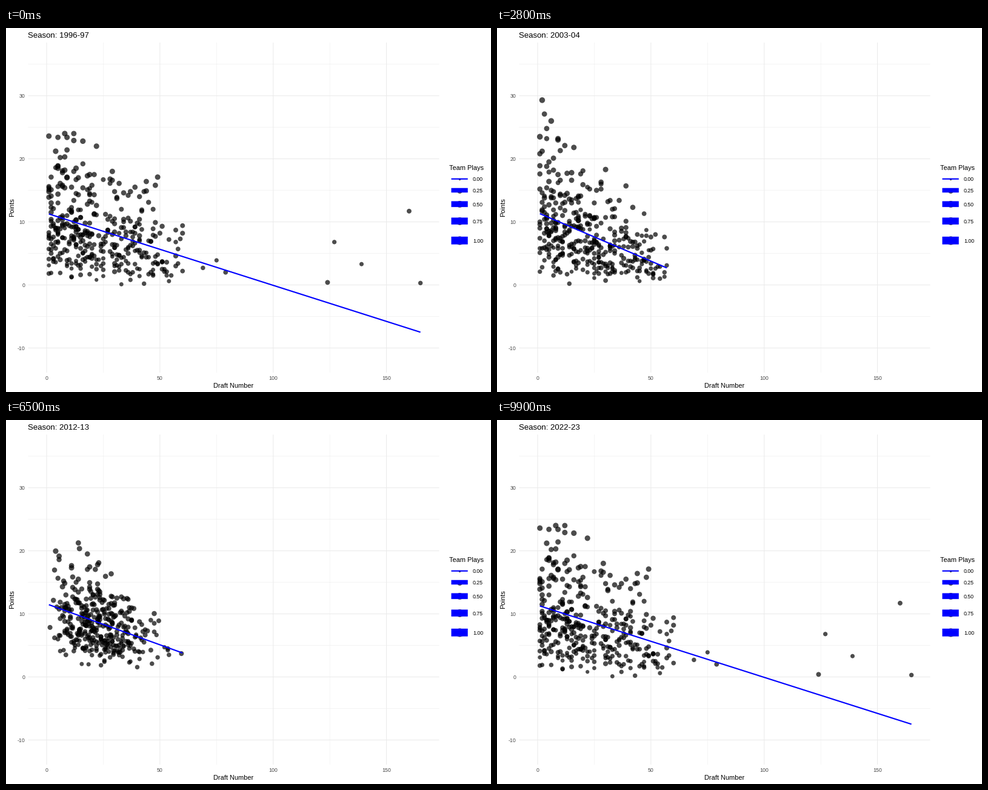
Write a matplotlib script that moves like this. It is 800x600 px and loops after 10 s.

```python
import numpy as np
import matplotlib.pyplot as plt
from matplotlib.animation import FuncAnimation

plt.rcParams["font.family"] = "Liberation Sans"
PT = 0.72  # points per pixel at 100 dpi
SEASONS = 27
BLUE, GREY = "#0000ff", "#4d4d4d"

# Late picks that are still playing in the first season
VETERANS = [(69, 2.7), (75, 3.9), (79, 2), (124, .4), (127, 6.8),
            (139, 3.3), (160, 11.7), (165, .3)]


def px(x):
    return 67 + 3.737 * np.asarray(x)


def py(y):
    return 423.5 - 10.395 * np.asarray(y)


def radius(usage):
    """Dot radius for a usage share: area scale from size 1 to 6, plus stroke."""
    size = 1 + 5 * np.sqrt(usage)
    return 0.375 * (2.845 * size + 0.945) + 0.35


def area(r):
    return (2 * r * PT) ** 2


def stroke(size):
    return 2.134 * size * PT


def last_pick(season):
    """Highest draft number; very late picks retire over the first seasons."""
    if season < 7:
        return 165 if season == 0 else 160 if season < 5 else 75
    return {8: 82, 15: 78}.get(season, int(min(60, 56.85 + season ** 2 / 80)))


def trend(season):
    """Regression line of one season: start and end point."""
    keys = [0, 4, 7, 13, 16, 23]
    start = np.interp(season, keys, [11.25, 11.35, 11.3, 12.05, 11.28, 13.7])
    slope = np.interp(season, keys, [-.1143, -.144, -.1536, -.137, -.1272, -.1625])
    first = 0 if 22 <= season <= 25 else 1
    last = last_pick(season)
    return np.array([(first, start), (last, start + slope * (last - first))])


def players(season):
    """Rows of draft number, points, dot radius in random order."""
    rng = np.random.default_rng(1996 + season)
    (x0, y0), (x1, y1) = trend(season)
    count = rng.integers(355, 385)
    x = x0 + np.floor((min(x1, 60) + 1 - x0) * rng.beta(0.95, 1.6, count))
    mean = np.maximum(y0 + (y1 - y0) * (x - x0) / (x1 - x0), 2.5)
    y = rng.gamma(2.7, mean / 2.7)
    cap = 16 + 15 * np.exp(-x / 25)
    y = np.where(y > cap, cap * rng.random(count), y)
    xy = np.column_stack([x, y.round(1)])
    if season == 0:
        xy = np.vstack([xy, VETERANS])
    elif x1 > 60:
        xy = np.vstack([xy, (75, 1.4), (x1, 4.4)])
    usage = 0.12 + 0.0065 * xy[:, 1] + rng.normal(0, 0.025, len(xy))
    return rng.permutation(np.column_stack([xy, radius(usage.clip(0.03, 0.4))]))


def schedule():
    """One (season, next season, progress, title season) per frame."""
    steps = []
    for s in range(SEASONS):
        following = (s + 1) % SEASONS
        hold = 1 if s > 20 else 2
        move = 1 if s in (12, SEASONS - 1) else 2
        steps += [(s, following, 0, s)] * hold
        for k in range(1, move + 1):
            t = k / move
            steps.append((s, following, t, max(s, following) if t > 0.5 else s))
    return steps


DOTS = [players(s) for s in range(SEASONS)]
LINES = [trend(s) for s in range(SEASONS)]
STEPS = schedule()

fig = plt.figure(figsize=(8, 6), dpi=100, facecolor="white")
ax = fig.add_axes([0, 0, 1, 1])
ax.set_xlim(0, 800)
ax.set_ylim(600, 0)
ax.axis("off")


def label(x, y, s, size, color="black", **kw):
    return ax.text(x, y, s, fontsize=size * PT, color=color, va="baseline", **kw)


def segment(xs, ys, **kw):
    return ax.plot(xs, ys, solid_capstyle="butt", snap=False, **kw)[0]


def grid(xs, ys, width):
    style = dict(color="#ebebeb", lw=width * PT, zorder=1)
    for x in px(xs):
        segment([x, x], [24, 568], **style)
    for y in py(ys):
        segment([36.5, 714.5], [y, y], **style)


x_ticks, y_ticks = np.arange(0, 151, 50), np.arange(-10, 31, 10)
grid(x_ticks[:-1] + 25, np.arange(-5, 36, 10), 0.53)
grid(x_ticks, y_ticks, 1.07)
for v in x_ticks:
    label(px(v), 580, str(v), 8.8, GREY, ha="center")
for v in y_ticks:
    label(31.5, py(v) + 3.2, str(v), 8.8, GREY, ha="right")
label(375, 593.3, "Draft Number", 11, ha="center")
label(13.5, 296, "Points", 11, ha="center", rotation=90, rotation_mode="anchor")
title = label(36, 16.2, "", 13.2)

label(731, 234, "Team Plays", 11)
for usage, y in zip((0, .25, .5, .75, 1), (248.8, 267.5, 290.3, 318.2, 350.3)):
    ax.scatter([748], [y], s=area(radius(usage)), c="black", alpha=0.7, lw=0, zorder=3)
    segment([734.5, 761.7], [y, y], color=BLUE, lw=stroke(1 + 5 * usage ** 0.5), zorder=4)
    label(770, y + 3.4, f"{usage:.2f}", 8.8)

dots = ax.scatter([], [], c="black", alpha=0.7, linewidths=0, zorder=3)
line = segment([], [], color=BLUE, lw=stroke(1), zorder=4)


def blend(a, b, t):
    """Rows matched by index; unmatched rows are hidden while moving."""
    if t in (0, 1):
        return b if t else a
    n = min(len(a), len(b))
    return a[:n] + (b[:n] - a[:n]) * t


def update(frame):
    s, following, t, named = STEPS[frame]
    rows = blend(DOTS[s], DOTS[following], t)
    dots.set_offsets(np.column_stack([px(rows[:, 0]), py(rows[:, 1])]))
    dots.set_sizes(area(rows[:, 2]))
    ends = blend(LINES[s], LINES[following], t)
    line.set_data(px(ends[:, 0]), py(ends[:, 1]))
    year = 1996 + named
    title.set_text(f"Season: {year}-{(year + 1) % 100:02d}")
    return dots, line, title


anim = FuncAnimation(fig, update, frames=len(STEPS), interval=100,
                     repeat=True, repeat_delay=0, blit=False)
plt.show()
```
